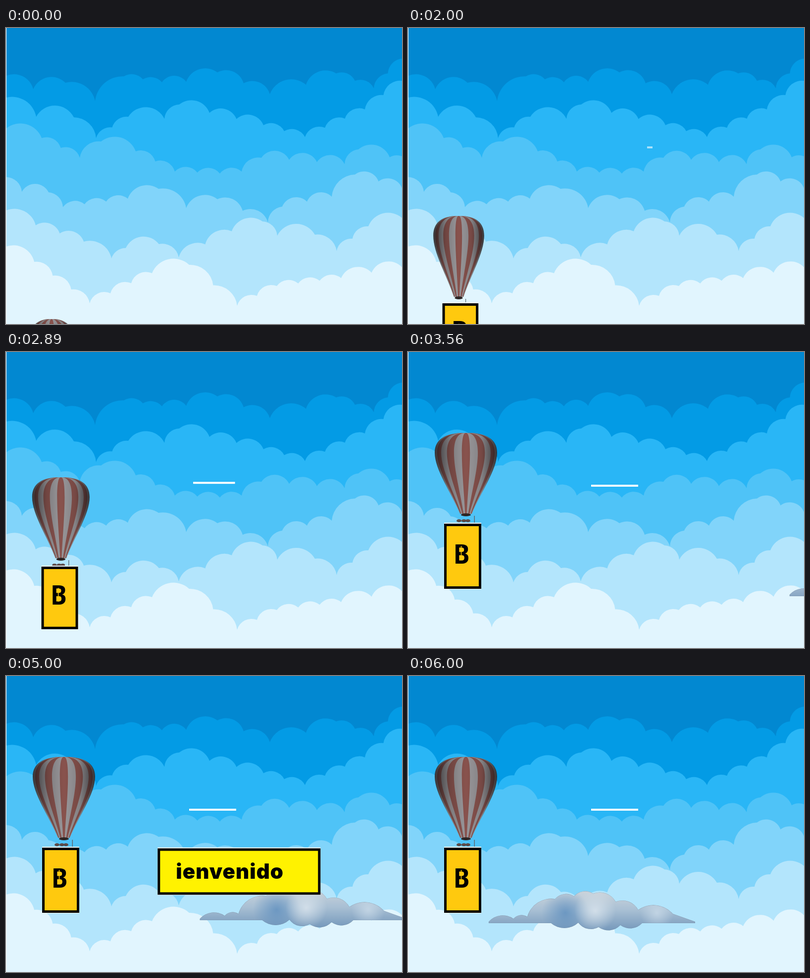
These frames come from a looping animation (800x600 px, 6110 ms). An HTML page with a canvas:

```html
<!DOCTYPE html>
<html lang="es">
<head>
<meta charset="utf-8">
<title>Bienvenido</title>
<style>
  html, body { margin: 0; width: 800px; height: 600px; overflow: hidden; background: #fff; }
  canvas { display: block; }
</style>
</head>
<body>
<canvas id="stage" width="800" height="600"></canvas>
<script>
const LOOP = 6110, STEPS = 55, LANDED = 31, PUFF = 51.5;
const ctx = document.getElementById('stage').getContext('2d');
const clamp = v => Math.min(1, Math.max(0, v));

// Runs a scalloped edge through "x,y x,y ..." key points, splitting long spans into equal puffs.
function puffs(text, radius) {
  const points = text.split(' ').map(pair => pair.split(',').map(Number));
  let [x, y] = points[0], d = `${x} ${y}`;
  for (const [endX, endY] of points.slice(1)) {
    const dx = endX - x, dy = endY - y, span = Math.hypot(dx, dy);
    const count = Math.max(1, Math.round(span / PUFF));
    const r = radius(span / count, Math.abs(dy / dx));
    for (let i = 1; i <= count; i++) d += `A${r} ${r} 0 0 1 ${x + dx * i / count} ${y + dy * i / count}`;
    [x, y] = [endX, endY];
  }
  return d;
}

const skyRadius = (chord, slope) => Math.max(30, chord * (0.56 + 0.2 * Math.min(1, slope)));
const layer = (color, ridge) =>
  ({ color, path: new Path2D(`M${puffs(ridge, skyRadius)}V600H0Z`) });

const sky = [
  layer('#039be5', '0,97 55,124 120,111 180,148 238,98 315,110 364,109 427,90 533,134 606,115 667,92 743,122 800,62'),
  layer('#29b6f6', '0,141 61,180 137,181 182,223 247,180 320,184 350,155 411,172 520,197 604,221 725,165 800,107'),
  layer('#4fc3f7', '0,204 72,223 149,263 192,230 262,250 341,291 432,295 476,291 516,263 684,276 712,246 775,262 800,260'),
  layer('#81d4fa', '0,302 32,332 86,333 115,363 246,346 308,326 364,365 427,347 529,394 558,362 658,342 705,297 800,325'),
  layer('#b3e5fc', '0,370 60,400 157,433 213,467 242,446 309,438 349,465 456,412 518,392 548,421 624,419 668,452 732,402 800,385'),
  layer('#e1f5fe', '0,443 57,474 169,558 295,497 370,480 467,563 547,523 677,507 800,485')
];

const cloudRadius = chord => chord * 0.75;
const cloudPath = new Path2D(
  `M${puffs('0,0 50,-6 78,-10 134,-46 211,-57 302,-24 372,-16', cloudRadius)}L417 0V3L` +
  `${puffs('310,3 222,11 181,2 126,3', cloudRadius)}H0Z`);

const envelope = new Path2D(
  'M0 0C40 -1 63 12 63 40C63 75 30 120 12 164H-12C-30 120 -63 75 -63 40C-63 12 -40 -1 0 0Z');

// Linear interpolation over [step, value] keys.
function tween(k, ...keys) {
  const next = keys.findIndex(([step]) => step > k);
  if (next < 0) return keys.at(-1)[1];
  const [[k0, v0], [k1, v1]] = keys.slice(next - 1, next + 1);
  return v0 + (v1 - v0) * (k - k0) / (k1 - k0);
}

function gradient(g, ...colors) {
  colors.forEach((color, i) => g.addColorStop(i / (colors.length - 1), color));
  return g;
}

function at(x, y, draw, sx = 1) {
  ctx.save();
  ctx.translate(x, y);
  ctx.scale(sx, 1);
  draw();
  ctx.restore();
}

function rect(color, x, y, w, h) {
  ctx.fillStyle = color;
  ctx.fillRect(x, y, w, h);
}

function ellipse(color, x, y, rx, ry) {
  ctx.fillStyle = color;
  ctx.beginPath();
  ctx.ellipse(x, y, rx, ry, 0, 0, 7);
  ctx.fill();
}

function panel(color, x, y, w, h) {
  rect('#eef6fa', x, y - 2, w, h + 3);
  rect('#000', x, y, w, h);
  rect(color, x + 5, y + 5, w - 10, h - 10);
}

function label(text, x, y, font) {
  ctx.fillStyle = '#000';
  ctx.font = font;
  ctx.fillText(text, x, y);
}

function balloon(x, y, width) {
  at(x, y, () => {
    // Nested, ever narrower envelopes leave the stripes of a round body.
    for (let i = 5; i >= 0; i--) {
      ctx.fillStyle = i % 2 ? '#a09ea1' : '#8f5650';
      at(0, 0, () => ctx.fill(envelope), Math.sin((i + 0.5) * Math.PI / 12));
    }
    ctx.fillStyle = gradient(ctx.createLinearGradient(-63, 0, 63, 0), 'rgba(20,18,20,.75)',
      'rgba(20,18,20,.25)', 'rgba(20,18,20,.05)', 'rgba(20,18,20,.2)', 'rgba(20,18,20,.75)');
    ctx.fill(envelope);
    ellipse('#2d2524', 0, 166, 10, 3);
    for (const side of [-14, -4, 4]) ellipse('#5d4b48', side, 178, 5, 3);
    rect('#5d6a70', 16.5, 168, 1.5, 14);
  }, width / 126);
}

function board(x, y, w, h) {
  panel('#ffc90e', x, y, w, h);
  label('B', x + w * 0.25, y + h * 0.61, '900 54px "Noto Sans Mono", "DejaVu Sans Mono", monospace');
  rect('#ffc90e', x + w * 0.45, y + h * 0.34, 1.5, 28);
}

function dash(k) {
  const q = clamp((k - 18) / 10);
  const hop = Math.sin(Math.PI * clamp((k - 18) / 8));
  const length = 11 + 84 * q ** 0.6;
  const x = 417.5 + 71 * (1 - q) ** 2, y = 271 - 29 * (1 - q) - 120 * hop;
  rect(k > 18 ? '#fff' : 'rgba(255,255,255,.6)', x - length / 2, y - 2, length, 4);
}

function cloud(x, y) {
  const glow = (color, cx, cy, r) => {
    ctx.fillStyle = gradient(ctx.createRadialGradient(cx, cy, 0, cx, cy, r), color + 'cc', color + '00');
    ctx.fillRect(cx - r, cy - r, 2 * r, 2 * r);
  };
  at(x, y, () => {
    ctx.fillStyle = gradient(ctx.createLinearGradient(0, -66, 0, 18), '#cfd6dc', '#a9c0d4', '#7598bb');
    ctx.fill(cloudPath);
    ctx.clip(cloudPath);
    glow('#5f8fbe', 155, -18, 48);
    glow('#dce6ee', 215, -22, 42);
    glow('#c9dae8', 340, -18, 34);
    ctx.strokeStyle = 'rgba(110,125,140,.5)';
    ctx.stroke(cloudPath);
  });
}

function word(x, y) {
  panel('#fff200', x, y, 329, 94);
  ctx.letterSpacing = '1px';
  label('ienvenido', x + 37, y + 62, '900 42px Inter, "Open Sans", sans-serif');
  ctx.letterSpacing = '0px';
}

function draw(now) {
  const k = Math.floor((now % LOOP + 6) * STEPS / LOOP) % STEPS;
  const grow = clamp(k / LANDED) ** 1.6;
  const top = tween(k, [0, 590], [11, 457], [18, 381], [26, 254], [LANDED, 164]);
  rect('#0288d1', 0, 0, 800, 600);
  for (const { color, path } of sky) {
    ctx.fillStyle = color;
    ctx.fill(path);
  }
  rect('#fff', 0, 0, 1, 600);
  if (k >= 18) dash(k);
  balloon(92 + 25 * grow, top, 86 + 40 * grow);
  board(67 + 6 * grow, top + 172 + 12 * grow, 71 + 4 * grow, 120 + 12 * grow ** 2);
  if (k >= LANDED) cloud(tween(k, [LANDED, 800], [49, 275], [54, 163]), k < 52 ? 492 : 498);
  if (k >= 36 && k < 52) {
    const hop = Math.abs(Math.sin(Math.PI * (k - 40) / 4.5));
    word(tween(k, [36, 820], [40, 654], [43, 300], [49, 319]), 386 - 107 * hop);
  }
}

const start = performance.now();
function tick() {
  draw(performance.now() - start);
  requestAnimationFrame(tick);
}
tick();
</script>
</body>
</html>
```
